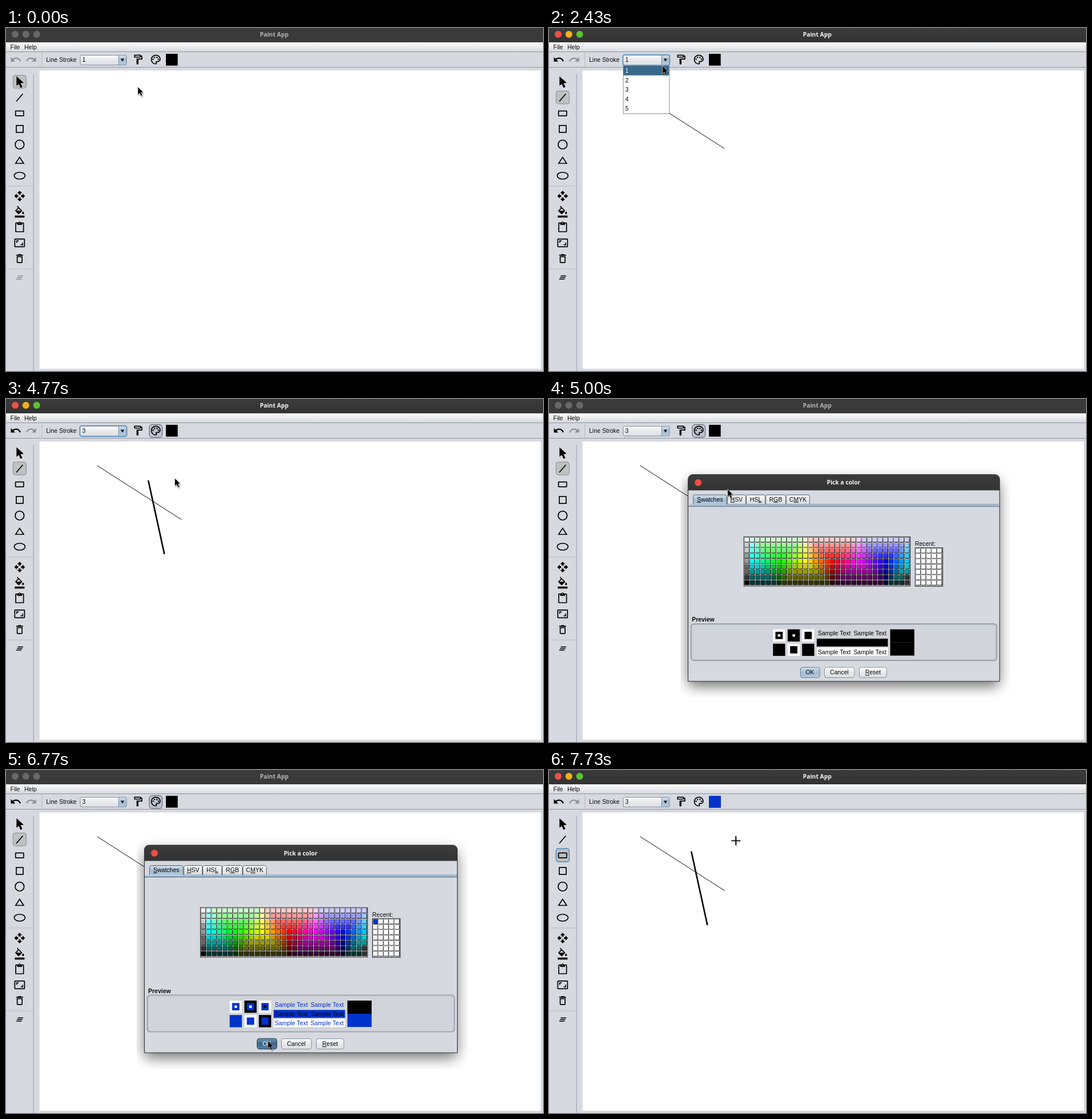
Recreate the animation shown at these times as an HTML page. Size 937x598 px, loop 8 s.

```html
<!DOCTYPE html>
<html lang="en">
<head>
<meta charset="utf-8">
<title>Paint App</title>
<style>
html, body { margin: 0; width: 100%; height: 100%; overflow: hidden; background: #d6d9df; }
svg { display: block; width: 937px; height: 598px; }
text { font: 10.5px "Liberation Sans", Arial, sans-serif; fill: #0a0a0a; white-space: pre; }
.title { font: bold 10.3px "Noto Sans", sans-serif; fill: #f4f4f4; text-anchor: middle; }
.dim { fill: #b4b4b4; }
.bold { font-weight: bold; }
.mid { text-anchor: middle; }
.u { text-decoration: underline; }
.shape { fill: none; stroke: #000; stroke-width: 1.7; }
.off { fill: #8c8f94; }
.rule { stroke: #9097a1; }
.dots { stroke: #8f959e; stroke-dasharray: 1 1.5; }
.down { fill: #bfc0c2; stroke: #8a8c90; }
.ring { fill: none; stroke: #6c9ac5; stroke-width: 1.8; }
.btn { fill: url(#btn); stroke: #8a9099; }
.cursor { filter: drop-shadow(1px 2px 1.3px rgba(0,0,0,.4)); }
</style>
</head>
<body>
<svg id="stage" viewBox="0 0 937 598" xmlns="http://www.w3.org/2000/svg">
  <defs>
    <linearGradient id="bar" x2="0" y2="1"><stop stop-color="#3b3b3b"/><stop offset="1" stop-color="#333"/></linearGradient>
    <linearGradient id="menu" x2="0" y2="1"><stop stop-color="#fff"/><stop offset=".35" stop-color="#f0f1f3"/><stop offset="1" stop-color="#d4d7dd"/></linearGradient>
    <linearGradient id="btn" x2="0" y2="1"><stop stop-color="#fcfcfd"/><stop offset=".5" stop-color="#e7e9ec"/><stop offset="1" stop-color="#dcdfe4"/></linearGradient>
    <linearGradient id="blue" x2="0" y2="1"><stop stop-color="#d3dfea"/><stop offset=".5" stop-color="#a6bed4"/><stop offset="1" stop-color="#b4cadd"/></linearGradient>
    <linearGradient id="press" x2="0" y2="1"><stop stop-color="#6f93b0"/><stop offset=".5" stop-color="#3d6789"/><stop offset="1" stop-color="#5a83a3"/></linearGradient>
    <filter id="blur" x="-20%" y="-20%" width="140%" height="140%"><feGaussianBlur stdDeviation="12"/></filter>
    <clipPath id="shade"><rect x="228" y="110" width="578" height="411"/></clipPath>
  </defs>

  <rect width="937" height="598" fill="#d6d9df"/>
  <rect width="937" height="25" fill="url(#bar)"/>
  <g data-on="0-790 5000-7730">
    <rect width="937" height="25" fill="#3a3a3a"/>
    <g fill="#686868"><circle cx="16" cy="11" r="6"/><circle cx="34.7" cy="11" r="6"/><circle cx="53.5" cy="11" r="6"/></g>
    <text class="title dim" x="468" y="14.5">Paint App</text>
  </g>
  <g data-on="790-5000 7730-8000">
    <circle cx="16" cy="11" r="6" fill="#ea5046"/><circle cx="34.7" cy="11" r="6" fill="#f5ae1b"/><circle cx="53.5" cy="11" r="6" fill="#57c530"/>
    <text class="title" x="468" y="14.5">Paint App</text>
  </g>
  <rect y="25" width="937" height="16.5" fill="url(#menu)"/>
  <path class="rule" d="M0 41.5H937M0 68.5H937M48 80V598"/>
  <text x="7.5" y="36.7">File</text><text x="32" y="36.7">Help</text>
  <path class="dots" d="M62.5 43V68M0 275.5H47M0 420H47"/>
  <rect x="58.5" y="74" width="874.5" height="520" fill="#fff"/>

  <!-- toolbar -->
  <text x="70" y="58.8">Line Stroke</text>
  <rect x="129.5" y="47.5" width="80.5" height="17" rx="2.5" class="btn"/>
  <path d="M196.5 47.5H208a2 2 0 0 1 2 2V62.5a2 2 0 0 1-2 2H196.5Z" fill="url(#blue)" stroke="#7f95ab"/>
  <path d="M200 53.5h6.4l-3.2 5z" fill="#111"/>
  <rect data-on="790-5000" class="ring" x="128.8" y="46.6" width="82" height="18.8" rx="3.5"/>
  <text data-on="0-3030" x="133" y="59">1</text>
  <text data-on="3030-8000" x="133" y="59">3</text>
  <rect data-on="3930-4100" class="btn" x="219" y="44.5" width="23" height="22.5" rx="4"/>
  <rect data-on="4100-4430" class="btn" x="250" y="44.5" width="23" height="22.5" rx="4"/>
  <rect data-on="4430-7000" x="250" y="44.5" width="22.6" height="22.5" rx="4.5" fill="#bcc2cc" stroke="#565c66"/>
  <rect x="279" y="45" width="20.6" height="20.6"/>
  <rect data-on="7000-8000" x="279" y="45" width="20.6" height="20.6" fill="#03c"/>

  <!-- tool column -->
  <rect data-on="0-790" class="down" x="12.3" y="82.5" width="23" height="22.5" rx="4"/>
  <rect data-on="790-7730" class="down" x="12.3" y="109.8" width="23" height="22.5" rx="4"/>
  <rect data-on="790-1430" class="ring" x="12.3" y="109.8" width="23" height="22.5" rx="4"/>
  <g data-on="7730-8000"><rect class="down" x="12.3" y="137" width="23" height="23" rx="4"/><rect class="ring" x="12.3" y="137" width="23" height="23" rx="4"/></g>
  <path d="M18.3 84.2V100.8L22.2 97.5 25.4 104.2 28.6 102.7 25.4 96.2 30.8 95.6Z"/>
  <g class="shape">
    <path d="M18 128L29.3 114.7"/>
    <rect x="16.6" y="144.6" width="14.2" height="8.6" rx=".6"/>
    <rect x="17.9" y="170" width="12" height="12"/>
    <circle cx="23.8" cy="203.2" r="7.8"/>
    <path d="M16.8 236L23.8 225.3 30.8 236Z"/>
    <ellipse cx="23.8" cy="257.5" rx="9.5" ry="6"/>
  </g>
  <g id="icons"></g>

  <!-- drawing -->
  <path data-on="1430-8000" d="M159 116L306.3 210.3" stroke="#000" stroke-width=".95"/>
  <g stroke="#000" stroke-width="2.6">
    <path data-on="3600-3770" d="M276.4 270.5L258 190"/>
    <path data-on="3770-8000" d="M276.4 270.5L248.3 142"/>
  </g>

  <g data-on="2230-3030" id="popup">
    <rect x="129.5" y="65.5" width="80.5" height="84" fill="#fff" stroke="#8a9099"/>
  </g>

  <!-- colour dialog -->
  <g data-on="5000-7000"><g id="dialog">
    <g clip-path="url(#shade)"><rect x="241" y="142" width="546" height="360" rx="8" opacity=".55" filter="url(#blur)"/></g>
    <path d="M241.5 493V139a8 8 0 0 1 8-8H779.5a8 8 0 0 1 8 8V493Z" fill="#d6d9df" stroke="#25282c"/>
    <path d="M241.5 158.5V139a8 8 0 0 1 8-8H779.5a8 8 0 0 1 8 8V158.5Z" fill="url(#bar)"/>
    <circle cx="259" cy="145" r="6" fill="#ea5046"/>
    <text class="title" x="514" y="148.7">Pick a color</text>
    <g id="tabs"></g>
    <rect x="242" y="183" width="545" height="3.2" fill="#b7c9da"/>
    <path d="M242 186.5H787" stroke="#31516f"/><path d="M309 183H787" stroke="#6d8296" stroke-width=".8"/>
    <g id="swatches"></g>
    <text x="639" y="255.8">Recent:</text>
    <g id="recent"></g>
    <rect data-on="6170-7000" x="640.7" y="260.3" width="8" height="8" fill="#03c"/>
    <text class="bold" x="248" y="388.8">Preview</text>
    <rect x="246.5" y="392.5" width="536" height="64" rx="5" fill="#d1d4da" stroke="#9299a3" stroke-width="1.6"/>
    <rect x="248.2" y="394.2" width="532.6" height="61" rx="4" fill="none" stroke="#c0c4cb"/>
    <g data-on="5000-6170" id="before"></g>
    <g data-on="6170-7000" id="after"></g>
    <rect x="438.5" y="468.5" width="34" height="18" rx="4" fill="url(#blue)" stroke="#5f7d99"/>
    <g data-on="0-6770"><text class="mid" x="455" y="481">OK</text></g>
    <g data-on="6770-7000">
      <rect x="438.2" y="468.2" width="34.4" height="18.4" rx="4" fill="url(#press)" stroke="#1f3c55"/>
      <text class="mid" x="455" y="481" style="fill:#fff">OK</text>
    </g>
    <rect class="btn" x="480.5" y="468.5" width="52.5" height="18" rx="4"/><text class="mid" x="506.5" y="481">Cancel</text>
    <rect class="btn" x="541.5" y="468.5" width="48" height="18" rx="4"/><text class="mid" x="565.5" y="481"><tspan class="u">R</tspan>eset</text>
  </g></g>

  <g id="pointer" class="cursor">
    <path id="arrow" d="M0 0V13.8L3.2 11 5.6 16 8 14.9 5.7 10.1 9.6 9.6Z" stroke="#fff" stroke-width=".6"/>
    <path id="cross" d="M-8 0H8M0-8V8" stroke="#000" stroke-width="1.7"/>
  </g>
</svg>
<script>
const LOOP = 8000;
const $ = id => document.getElementById(id);
const rect = (x, y, w, h, fill) => `<rect x="${x}" y="${y}" width="${w}" height="${h}" fill="${fill}"/>`;

// 24-unit icons: centre x, centre y, scale, attributes, path
const undo = 'M12.5 8c-2.65 0-5.05.99-6.9 2.6L2 7v9h9l-3.62-3.62c1.39-1.16 3.16-1.88 5.12-1.88 3.54 0 6.55 2.31 7.6 5.5l2.37-.78C21.08 11.03 17.15 8 12.5 8z';
const clear = 'M5 13h14v-2H5v2zm-2 4h14v-2H3v2zM7 7v2h14V7H7z';
const dot = (x, y) => `M${x - 1.5} ${y}a1.5 1.5 0 1 0 3 0a1.5 1.5 0 1 0-3 0z`;
const icons = [
  [17, 55, .85, 'class="off" data-on="0-1900"', undo],
  [17, 55, .85, 'data-on="1900-8000"', undo],
  [44, 55, .85, 'class="off"', 'M18.4 10.6C16.55 8.99 14.15 8 11.5 8c-4.65 0-8.58 3.03-9.96 7.22L3.9 16c1.05-3.19 4.05-5.5 7.6-5.5 1.95 0 3.73.72 5.12 1.88L13 16h9V7l-3.6 3.6z'],
  [230.3, 55, .85, 'fill-rule="evenodd"', 'M18 4V3c0-.55-.45-1-1-1H5c-.55 0-1 .45-1 1v4c0 .55.45 1 1 1h12c.55 0 1-.45 1-1V6h1v4H9v11c0 .55.45 1 1 1h2c.55 0 1-.45 1-1v-9h8V4zM16 6H6V4h10z'],
  [261.3, 55, .85, 'fill-rule="evenodd"', 'M12 22C6.49 22 2 17.51 2 12S6.49 2 12 2s10 4.04 10 9c0 3.31-2.69 6-6 6h-1.77c-.28 0-.5.22-.5.5 0 .12.05.23.13.33.41.47.64 1.06.64 1.67A2.5 2.5 0 0 1 12 22zm0-18c-4.41 0-8 3.59-8 8s3.59 8 8 8c.28 0 .5-.22.5-.5a.54.54 0 0 0-.14-.35c-.41-.46-.63-1.05-.63-1.65a2.5 2.5 0 0 1 2.5-2.5H16c2.21 0 4-1.79 4-4 0-3.86-3.59-7-8-7z'
    + dot(6.5, 11.5) + dot(9.5, 7.5) + dot(14.5, 7.5) + dot(17.5, 11.5)],
  [23.8, 293, .85, '', 'M10 9h4V6h3l-5-5-5 5h3v3zm-1 1H6V7l-5 5 5 5v-3h3v-4zm14 2l-5-5v3h-3v4h3v3l5-5zm-9 3h-4v3H7l5 5 5-5h-3v-3z'],
  [23.8, 320.3, .85, '', 'M16.56 8.94L7.62 0 6.21 1.41l2.38 2.38-5.15 5.15c-.59.59-.59 1.54 0 2.12l5.5 5.5c.29.29.68.44 1.06.44s.77-.15 1.06-.44l5.5-5.5c.59-.58.59-1.53 0-2.12zM5.21 10L10 5.21 14.79 10H5.21zM19 11.5s-2 2.17-2 3.5c0 1.1.9 2 2 2s2-.9 2-2c0-1.33-2-3.5-2-3.5zM2 20h20v4H2v-4z'],
  [23.8, 347.6, .85, '', 'M19 2h-4.18C14.4.84 13.3 0 12 0c-1.3 0-2.4.84-2.82 2H5c-1.1 0-2 .9-2 2v16c0 1.1.9 2 2 2h14c1.1 0 2-.9 2-2V4c0-1.1-.9-2-2-2zm-7 0c.55 0 1 .45 1 1s-.45 1-1 1-1-.45-1-1 .45-1 1-1zm7 18H5V4h2v3h10V4h2v16z'],
  [23.8, 374.6, .85, '', 'M19 12h-2v3h-3v2h5v-5zM7 9h3V7H5v5h2V9zm14-6H3c-1.1 0-2 .9-2 2v14c0 1.1.9 2 2 2h18c1.1 0 2-.9 2-2V5c0-1.1-.9-2-2-2zm0 16.01H3V4.99h18v14.02z'],
  [23.8, 402, .85, '', 'M6 19c0 1.1.9 2 2 2h8c1.1 0 2-.9 2-2V7H6v12zM8 9h8v10H8V9zm7.5-5l-1-1h-5l-1 1H5v2h14V4h-3.5z'],
  [23.9, 435, .68, 'class="off" data-on="0-1900"', clear],
  [23.9, 435, .68, 'data-on="1900-8000"', clear],
];
$('icons').innerHTML = icons.map(([x, y, s, attrs, d]) =>
  `<path ${attrs} transform="translate(${x} ${y}) scale(${s}) translate(-12 -12)" d="${d}"/>`).join('');

// drop-down rows, each highlighted while the pointer is over it
const hover = ['2230-2570', '2570-2700', '2700-3030'];
for (let i = 0; i < 5; i++) {
  const y = 66 + i * 16.6;
  const label = fill => `<text x="133" y="${y + 12}" style="fill:${fill}">${i + 1}</text>`;
  $('popup').innerHTML += label('#0a0a0a') +
    (hover[i] ? `<g data-on="${hover[i]}">${rect(130, y, 79.5, 16.6, '#39698a')}${label('#fff')}</g>` : '');
}

// tabs: left, right, text before / under / after the mnemonic
$('tabs').innerHTML = [
  [250.5, 309, '', 'S', 'watches'], [310.5, 342.5, '', 'H', 'SV'], [343.5, 376.5, 'HS', 'L', ''],
  [377.5, 412.5, 'R', 'G', 'B'], [413.5, 454.5, 'C', 'M', 'YK'],
].map(([l, r, a, u, b], i) =>
  `<path d="M${l} 183.5V169.5a3 3 0 0 1 3-3H${r - 3}a3 3 0 0 1 3 3V183.5Z" fill="url(#${i ? 'btn' : 'blue'})" stroke="#59646f"/>` +
  `<text class="mid" x="${(l + r) / 2}" y="178">${a}<tspan class="u">${u}</tspan>${b}</text>`).join('');

// swatch table: one hue wheel in 30 steps, raised or capped per row
const PITCH = 9.36;
const GREYS = [255, 204, 204, 153, 153, 102, 102, 51, 0];
function wheel(col) {
  const h = 14 + col;
  return [0, 20, 10].map(shift => {
    const d = Math.abs((h - shift + 75) % 30 - 15);
    return 51 * Math.max(0, Math.min(5, 10 - d));
  });
}
function swatch(row, col) {
  const g = GREYS[row];
  if (!col) return `rgb(${g},${g},${g})`;
  if (col === 30 && row > 6) return '#333';
  const fit = v => row < 4 ? Math.max(v, 204 - 51 * row) : Math.min(v, 255 - 51 * (row - 4));
  return `rgb(${wheel(col).map(fit)})`;
}
function grid(x, y, cols, rows, color) {
  let out = `<rect x="${x}" y="${y}" width="${cols * PITCH + 1.4}" height="${rows * PITCH + 1.9}" fill="#fff" stroke="#111"/>`;
  for (let r = 0; r < rows; r++) for (let c = 0; c < cols; c++) {
    const cx = x + 1.1 + c * PITCH, cy = y + 1.1 + r * PITCH;
    out += rect(cx, cy, 8.6, 8.6, '#000') + rect(cx, cy, 7.7, 7.7, color(r, c));
  }
  return out;
}
$('swatches').innerHTML = grid(339.3, 240, 31, 9, swatch);
$('recent').innerHTML = grid(639.6, 259.2, 5, 7, () => '#fff');

function preview(color) {
  const box = (x, y, ...fills) => fills.map((f, i) => {
    const pad = [0, 4.25, 8.5][i];
    return rect(x + pad, y + pad, 21.3 - 2 * pad, 21.3 - 2 * pad, f);
  }).join('');
  const sample = (y, fill) => [469, 531.5].map(x => `<text x="${x}" y="${y}" style="fill:${fill}">Sample Text</text>`).join('');
  return box(390.3, 402, '#fff', color, '#fff') + box(416, 402, '#000', color, '#fff') + box(441.3, 402, '#fff', color, '#000') +
    box(390.3, 427.2, color) + box(416, 427.2, '#fff', color) + box(441.3, 427.2, '#000', color) +
    sample(412.8, color) +
    rect(467, 418.3, 124.6, 13.8, color) + sample(429, '#000') +
    rect(467, 434, 124.6, 14.3, '#fff') + sample(445.2, color) +
    rect(595.7, 402, 42.3, 23.2, '#000') + rect(595.7, 425, 42.3, 23, color);
}
$('before').innerHTML = preview('#000');
$('after').innerHTML = preview('#0033cc');

// pointer stops: time, x, y, crosshair
const stops = [
  [0, 230, 102.5], [900, 26, 117],
  [1430, 307, 211.5, 1], [1900, 285, 160, 1], [2070, 226, 88, 1], [2230, 203, 56], [2400, 198, 66],
  [2570, 186, 88], [2700, 177, 104], [2870, 174, 107],
  [3030, 190, 128, 1], [3230, 276, 269, 1],
  [3600, 258, 190, 1], [3770, 248, 142, 1], [3930, 236, 58], [4100, 257, 57], [4270, 266, 58], [4430, 268, 58],
  [4770, 294.5, 138], [5000, 311.5, 157], [5230, 336, 190], [5400, 366, 236], [5570, 392, 276], [5730, 406, 293],
  [5900, 389.5, 287.5], [6330, 418, 374], [6500, 450, 458], [6770, 457, 472],
  [7000, 84, 82, 1], [7300, 36, 146], [7730, 326, 123, 1],
];
function pointerAt(t) {
  if (t >= 300 && t < 900) {
    const k = Math.min(1, (Math.floor((t - 300) / 37.5) + 1) / 13);
    const e = k * k * (3 - 2 * k);
    return [t, 230 - 204 * e, 102.5 + 14.5 * e];
  }
  return stops.findLast(s => s[0] <= t);
}

const timed = [...document.querySelectorAll('[data-on]')].map(el =>
  [el, el.dataset.on.split(' ').map(span => span.split('-').map(Number))]);

function draw(t) {
  for (const [el, spans] of timed)
    el.style.display = spans.some(([a, b]) => t >= a && t < b) ? '' : 'none';
  const [, x, y, cross] = pointerAt(t);
  $('pointer').setAttribute('transform', `translate(${x} ${y})`);
  $('arrow').style.display = cross ? 'none' : '';
  $('cross').style.display = cross ? '' : 'none';
  // the dialog opens a touch smaller before settling
  const s = t < 5230 ? .9955 : 1;
  $('dialog').setAttribute('transform', `translate(514 312) scale(${s}) translate(-514 -312)`);
}

const start = performance.now();
function tick() {
  draw((performance.now() - start) % LOOP);
  requestAnimationFrame(tick);
}
draw(0);
tick();
</script>
</body>
</html>
```
